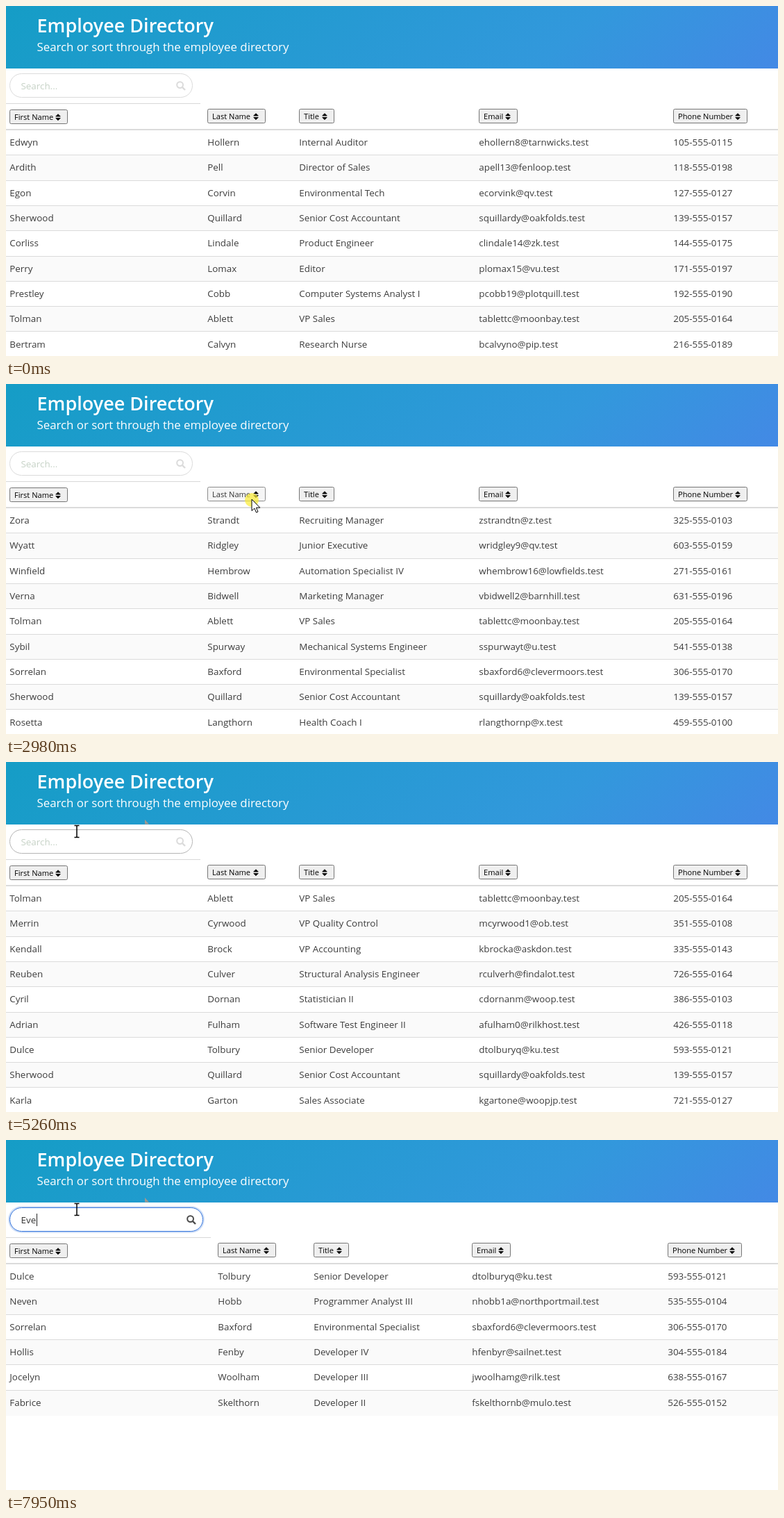
These frames come from a looping animation (1112 px wide and 504 px high, 8000 ms). An HTML page:

```html
<!DOCTYPE html>
<html lang="en">
<head>
<meta charset="utf-8">
<title>Employee Directory</title>
<style>
html, body { margin: 0; width: 100%; height: 100%; overflow: hidden; background: #fff; }
#stage { position: relative; width: 1112px; height: 504px; overflow: hidden; background: #fff;
  font: 13.4px "Open Sans", "Noto Sans", sans-serif; color: #3c3c3c; white-space: nowrap; }
#stage div, #stage svg, .cell { position: absolute; }
#hero { left: 0; top: 0; width: 1112px; height: 90px; color: #fff;
  background: linear-gradient(141deg, #159dc6 0%, #3298dc 71%, #4389e5 100%); }
#hero div { left: 44.5px; }
#name { top: 8px; font-size: 27px; font-weight: 600; line-height: 40px; }
#sub { top: 43.5px; font-size: 16.85px; line-height: 30px; }
#search { left: 5px; top: 96.5px; height: 35.5px; box-sizing: border-box;
  border: 1px solid #dbdbdb; border-radius: 18px; }
#search.hover { border-color: #b5b5b5; }
#search.focus { border-color: #3273dc; box-shadow: 0 0 0 1.8px rgba(50, 115, 220, .25); }
#query { left: 15.5px; top: 0; line-height: 35px; color: #363636; }
#query.empty { color: #c6d2c6; }
#caret { left: 0; top: 8.5px; width: 1px; height: 18px; background: #222; }
#lens { right: 9.5px; top: 10.5px; color: #dbdbdb; }
.focus #lens { color: #4a4a4a; }
#line { left: 0; top: 139.5px; height: 1px; background: #d8d8d8; }
#head { left: 0; top: 177px; width: 1112px; height: 2px; background: #dbdbdb; }
.btn { top: 148px; height: 21.4px; box-sizing: border-box; border: 1px solid #767676; border-radius: 2.5px;
  background: #efefef; color: #000; font-size: 11.1px; line-height: 19.2px; padding-left: 6px; }
.btn svg { right: 9.3px; top: 4.8px; }
.btn.hover { background: #e5e5e5; border-color: #4f4f4f; }
.btn.active { background: #f5f5f5; border-color: #8d8d8d; color: #333; }
.row { left: 0; width: 1112px; height: 36.3px; line-height: 35.4px; box-sizing: border-box;
  border-bottom: 1px solid #dbdbdb; }
.row:nth-child(even) { background: #fafafa; }
.row:last-child { border-bottom-color: transparent; }
#trace { left: 200px; top: 83px; }
#pointer { left: 0; top: 0; overflow: visible; }
</style>
</head>
<body>
<div id="stage">
  <div id="hero">
    <div id="name">Employee Directory</div>
    <div id="sub">Search or sort through the employee directory</div>
  </div>
  <div id="search">
    <div id="query"></div>
    <div id="caret"></div>
    <svg id="lens" width="14" height="14" fill="none" stroke="currentColor" stroke-width="2">
      <circle cx="5.6" cy="5.6" r="4.4"/><path d="M9 9l4 4" stroke-width="2.4"/>
    </svg>
  </div>
  <div id="line"></div>
  <div id="buttons"></div>
  <div id="head"></div>
  <div id="rows"></div>
  <svg id="trace" width="7" height="7"><path d="M0 0V6.4H6z" fill="#a0988f"/></svg>
  <svg id="pointer" width="1" height="1">
    <circle id="press" cy="1" r="10" fill="#f9ec38" opacity=".72"/>
    <path id="arrow" d="M0 0V16.5L3.9 13 6.5 19 9 17.9 6.4 12.1H11.8Z" fill="#fff" stroke="#000"/>
    <path id="beam" d="M-3.5 -8.5H-.8L0 -7.7 .8 -8.5H3.5M0 -7.7V7.7M-3.5 8.5H-.8L0 7.7 .8 8.5H3.5"
      fill="none" stroke="#000" stroke-width="1.5"/>
  </svg>
</div>
<script>
const LOOP = 8000;
const $ = id => document.getElementById(id);

// name | title | mail suffix @ host | area code and last two digits
const people = `Edwyn Hollern|Internal Auditor|8@tarnwicks|10515
Ardith Pell|Director of Sales|13@fenloop|11898
Egon Corvin|Environmental Tech|k@qv|12727
Sherwood Quillard|Senior Cost Accountant|y@oakfolds|13957
Corliss Lindale|Product Engineer|14@zk|14475
Perry Lomax|Editor|15@vu|17197
Prestley Cobb|Computer Systems Analyst I|19@plotquill|19290
Tolman Ablett|VP Sales|c@moonbay|20564
Bertram Calvyn|Research Nurse|o@pip|21689
Zora Strandt|Recruiting Manager|n@z|32503
Wyatt Ridgley|Junior Executive|9@qv|60359
Winfield Hembrow|Automation Specialist IV|16@lowfields|27161
Verna Bidwell|Marketing Manager|2@barnhill|63196
Sybil Spurway|Mechanical Systems Engineer|t@u|54138
Sorrelan Baxford|Environmental Specialist|6@clevermoors|30670
Rosetta Langthorn|Health Coach I|p@x|45900
Edmonda Yarrow|Graphic Designer|z@jotloom|33767
Jocelyn Woolham|Developer III|g@rilk|63867
Matilda Vanterpool|Chemical Engineer|10@kindtrail|32600
Delia Umbers|GIS Technical Architect|s@mulo|52241
Barnet Tunningford|Mechanical Systems Engineer|4@thelongtor|71710
Dulce Tolbury|Senior Developer|q@ku|59321
Kimberly Tamsin|Account Representative III|11@po|28790
Merrin Cyrwood|VP Quality Control|1@ob|35108
Kendall Brock|VP Accounting|a@askdon|33543
Reuben Culver|Structural Analysis Engineer|h@findalot|72664
Cyril Dornan|Statistician II|m@woop|38603
Adrian Fulham|Software Test Engineer II|0@rilkhost|42618
Karla Garton|Sales Associate|e@woopjp|72127
Neven Hobb|Programmer Analyst III|1a@northportmail|53504
Hollis Fenby|Developer IV|r@sailnet|30484
Fabrice Skelthorn|Developer II|b@mulo|52652`.split('\n').map(line => {
  const [name, title, mail, tel] = line.split('|');
  const [first, last] = name.split(' ');
  return {
    text: line.toLowerCase(),
    cells: [first, last, title, (first[0] + last).toLowerCase() + mail + '.test',
      tel.slice(0, 3) + '-555-01' + tel.slice(3)]
  };
});

// time, column, direction
const sorts = [[0, 4, 1], [1420, 0, 1], [2230, 0, -1], [3070, 1, 1], [3480, 1, -1], [4050, 2, 1], [4680, 2, -1]];
const typing = [[0, ''], [6490, 'E'], [6720, 'Ev'], [6860, 'Eve'], [7130, 'Even'], [7950, 'Eve']];
const blinks = [[0, 0], [5350, 1], [5670, 0], [5990, 1], [6260, 0], [6490, 1], [7450, 0], [7770, 1]];
const presses = [[1370, 1420], [2140, 2230], [2980, 3070], [3390, 3480], [4000, 4050], [4590, 4680], [5350, 5440]];
const path = [[270, 430, 474], [420, 310, 302], [560, 310, 302], [710, 112, 194], [850, 112, 194],
  [1140, 66, 158], [2590, 66, 158], [2940, 354, 166], [3750, 354, 166], [3950, 462, 160],
  [4910, 462, 160], [5060, 330, 60], [5160, 200, 83], [5260, 102, 100]];
const wide = [5, 290, 422, 681, 961];
const layouts = [wide, wide, [5, 305, 443, 671, 953], [5, 305, 443, 671, 953], [5, 309, 444, 663, 950]];
const labels = ['First Name', 'Last Name', 'Title', 'Email', 'Phone Number'];
const widths = [84, 84, 51, 56, 107];
const FOCUS = 5350, BEAM = 5210, TRACE = 5160, ROW = 36.3;

const latest = (list, t) => list.filter(e => e[0] <= t).pop();
const show = (id, on) => $(id).style.display = on ? '' : 'none';

$('buttons').innerHTML = labels.map((label, i) =>
  `<div class="btn" style="width:${widths[i]}px;${i ? '' : 'top:149px'}">${label}
  <svg width="8" height="11"><path d="M.7 4L4 .7 7.3 4zM.7 6.4H7.3L4 9.7z" stroke="#000" stroke-width=".8" stroke-linejoin="round"/></svg></div>`).join('');
const buttons = [...document.querySelectorAll('.btn')];

function pointerAt(t) {
  const i = path.findIndex(p => p[0] > t);
  if (i < 0) return path[path.length - 1].slice(1);
  if (!i) return null;
  const [a, b] = [path[i - 1], path[i]];
  const k = Math.floor((t - a[0]) / 50) * 50 / (b[0] - a[0]);
  return [a[1] + (b[1] - a[1]) * k, a[2] + (b[2] - a[2]) * k];
}

let drawn = '';
function drawTable([, column, dir], query) {
  const key = column + '/' + dir + '/' + query;
  if (key === drawn) return;
  drawn = key;
  const cols = layouts[query.length];
  const order = (a, b) => a.cells[column] < b.cells[column] ? -dir : dir;
  const list = people.filter(p => p.text.includes(query.toLowerCase())).sort(order).slice(0, 9);
  $('rows').innerHTML = list.map((p, i) =>
    `<div class="row" style="top:${179.1 + i * ROW}px">` +
    p.cells.map((c, j) => `<span class="cell" style="left:${cols[j] + .3}px">${c}</span>`).join('') +
    '</div>').join('');
  buttons.forEach((b, i) => b.style.left = cols[i] + 'px');
  $('search').style.width = cols[1] - 26 + 'px';
  $('line').style.width = cols[1] - 10.5 + 'px';
  $('query').textContent = query || 'Search...';
  $('query').className = query ? '' : 'empty';
  $('caret').style.left = 15.5 + (query ? $('query').offsetWidth : 0) + 'px';
}

function draw(t) {
  drawTable(latest(sorts, t), latest(typing, t)[1]);
  const pos = pointerAt(t);
  const pressed = presses.some(([a, b]) => t >= a && t < b);
  const beam = t >= BEAM;
  $('search').className = t >= FOCUS ? 'focus' : beam ? 'hover' : '';
  show('caret', latest(blinks, t)[1]);
  show('trace', t >= TRACE);
  show('pointer', pos);
  show('press', pressed);
  show('arrow', !beam);
  show('beam', beam);
  if (pos) $('pointer').style.transform = `translate(${pos[0]}px, ${pos[1]}px)`;
  buttons.forEach((b, i) => {
    const over = pos && !beam && pos[1] >= 148 && pos[1] <= 170 &&
      pos[0] >= wide[i] && pos[0] <= wide[i] + widths[i];
    b.className = 'btn' + (over ? pressed ? ' active' : ' hover' : '');
  });
}

const start = performance.now();
function tick() {
  draw((performance.now() - start) % LOOP);
  requestAnimationFrame(tick);
}
tick();
</script>
</body>
</html>
```
